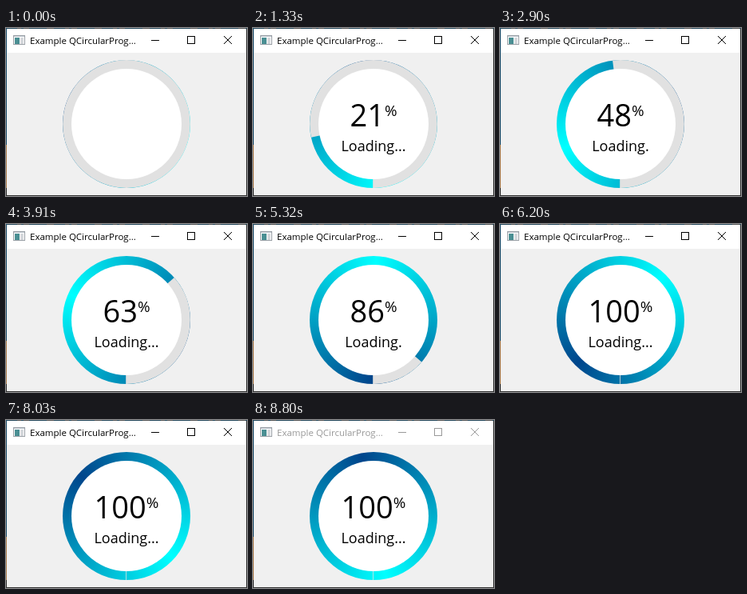
An HTML page that plays this animation: 302 by 210 pixels, repeating every 8.82 s.

```html
<!DOCTYPE html>
<html lang="en">
<head>
<meta charset="utf-8">
<title>Circular progress</title>
<style>
  html, body { margin: 0; width: 100%; height: 100%; overflow: hidden; background: #f0f0f0; }
  svg { position: absolute; left: 0; top: 0; width: 302px; height: 210px; }
  text { font-family: "Open Sans", "Noto Sans", sans-serif; }
  #sweep { position: absolute; left: 71px; top: 40px; width: 160px; height: 160px; border-radius: 50%; }
  .bar { color: #000; }
  .bar.inactive { color: #999; }
</style>
</head>
<body>
<div id="sweep"></div>
<svg viewBox="0 0 302 210">
  <rect width="302" height="31" fill="#fff"/>

  <!-- desktop showing around the window -->
  <g shape-rendering="crispEdges">
    <path d="M0 .5H302" stroke="#555"/>
    <path d="M0 .5H302" stroke="#24485c" stroke-dasharray="14 5 3 7 22 9"/>
    <path d="M.5 0V146" stroke="#1d4f6d"/>
    <path d="M.5 146V200" stroke="#b08050"/>
    <path d="M.5 200V209.500H302M301.500 1V210" fill="none" stroke="#333"/>
  </g>

  <g id="bar" class="bar">
    <g shape-rendering="crispEdges">
      <rect x="9.500" y="9.500" width="14" height="11" fill="#fff" stroke="#9aa0a6"/>
      <rect x="10" y="10" width="13" height="1" fill="#c3cad2"/>
      <rect x="11" y="12" width="6" height="8" fill="#4a8f93"/>
      <rect x="18" y="12" width="4" height="8" fill="#d5d8dc"/>
    </g>
    <text x="30" y="20" font-size="11.500" fill="currentColor">Example QCircularProg...</text>
    <g fill="none" stroke="currentColor">
      <path d="M182 15.500H192" shape-rendering="crispEdges"/>
      <rect x="227.500" y="10.500" width="9" height="9" shape-rendering="crispEdges"/>
      <path d="M273 10L283 20M283 10L273 20"/>
    </g>
  </g>

  <circle id="rest" cx="151" cy="120" r="73.400" pathLength="100" fill="none"
          stroke="#e1e1e1" stroke-width="13" transform="rotate(90 151 120)"/>
  <path d="M150.500 189V200" stroke="#e1e1e1" stroke-width=".8"/>
  <circle cx="151" cy="120" r="69" fill="#fff"/>

  <g id="label" text-anchor="middle">
    <text x="151" y="123" font-size="38"><tspan id="count"></tspan><tspan font-size="19" dy="-13.500">%</tspan></text>
    <text id="status" x="151" y="154" font-size="18"></text>
  </g>
</svg>
<script>
const LOOP = 8820, BLUR_AT = 8740;
const $ = id => document.getElementById(id);

// [time in ms, percent]
const progress = [[0, 0], [1330, 21.8], [2900, 48], [3910, 63.6], [5320, 86.4], [6170, 100], [LOOP, 100]];

function valueAt(t) {
  const i = progress.findIndex(p => p[0] > t);
  const [t0, v0] = progress[i - 1], [t1, v1] = progress[i];
  return v0 + (v1 - v0) * (t - t0) / (t1 - t0);
}

function draw(t) {
  const value = valueAt(t), shown = Math.floor(value);
  const angle = t * 421 / 8800 + 108;
  $("sweep").style.background = `conic-gradient(from ${angle}deg, #0ff, #00468c, #0ff)`;
  $("rest").setAttribute("stroke-dasharray", `0 ${value} ${100 - value} 100`);
  $("rest").style.display = value < 100 ? "" : "none";
  $("label").style.display = t < 20 ? "none" : "";
  $("count").textContent = shown;
  $("status").textContent = "Loading" + ".".repeat((Math.floor(shown / 10) + 1) % 4);
  $("bar").classList.toggle("inactive", t >= BLUR_AT);
}

const start = performance.now();
function tick() {
  const t = (performance.now() - start) % LOOP;
  draw(Math.floor(t / 20) * 20);
  requestAnimationFrame(tick);
}
draw(0);
requestAnimationFrame(tick);
</script>
</body>
</html>
```
